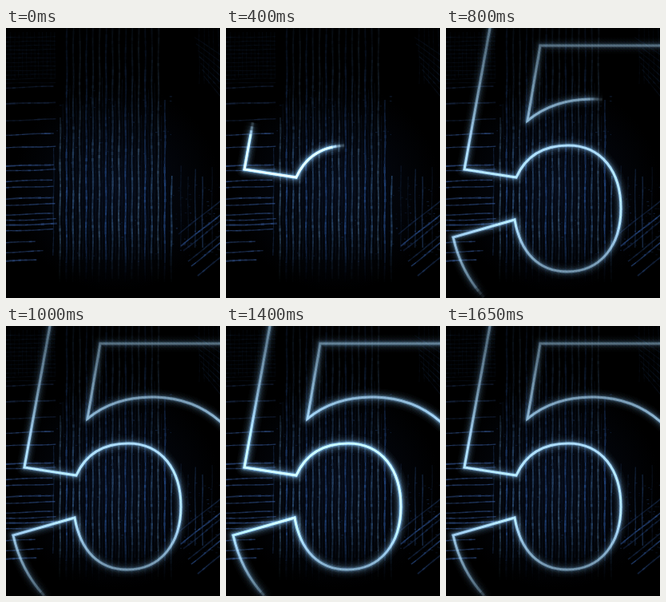
These frames come from a looping animation (268x338 px, 8000 ms). An HTML page with a canvas:

```html
<!DOCTYPE html>
<html lang="en">
<head>
<meta charset="utf-8">
<title>Neon five</title>
<style>
  html, body { margin: 0; width: 100%; height: 100%; overflow: hidden; background: #000; }
  canvas { position: absolute; left: 0; top: 0; width: 268px; height: 338px; }
</style>
</head>
<body>
<canvas id="wall" width="268" height="338"></canvas>
<canvas id="neon" width="268" height="338" style="mix-blend-mode: screen"></canvas>
<script>
const W = 268, H = 338, LOOP = 8000;
const wall = document.getElementById('wall').getContext('2d');
const neon = document.getElementById('neon').getContext('2d');

let seed = 57;
const rnd = () => (seed = (seed * 16807) % 2147483647) / 2147483647;

// Linear interpolation through [position, value] points
function along(points, x) {
  if (x <= points[0][0]) return points[0][1];
  for (let i = 1; i < points.length; i++) {
    const [x0, v0] = points[i - 1], [x1, v1] = points[i];
    if (x <= x1) return v0 + (v1 - v0) * (x - x0) / (x1 - x0);
  }
  return points[points.length - 1][1];
}

// A rough scratched line whose strength varies along its length
function scratch(x0, y0, x1, y1, width, strength, color = '42,78,132') {
  const n = Math.max(2, Math.round(Math.hypot(x1 - x0, y1 - y0) / 4));
  const wobble = rnd() * 6;
  const at = i => {
    const k = i / n, d = Math.sin(i * 0.35 + wobble) * 0.35;
    const side = Math.abs(x1 - x0) > Math.abs(y1 - y0);
    return [x0 + (x1 - x0) * k + (side ? 0 : d), y0 + (y1 - y0) * k + (side ? d : 0)];
  };
  for (let i = 0; i < n; i++) {
    const [ax, ay] = at(i), [bx, by] = at(i + 1);
    const a = strength(ax, ay) * (0.55 + 0.45 * rnd());
    wall.strokeStyle = `rgba(${color},${a})`;
    wall.lineWidth = width * (0.75 + 0.5 * rnd());
    wall.beginPath();
    wall.moveTo(ax, ay);
    wall.lineTo(bx, by);
    wall.stroke();
  }
}

function drawWall() {
  wall.fillStyle = '#000';
  wall.fillRect(0, 0, W, H);

  const haze = wall.createRadialGradient(138, 200, 10, 138, 200, 130);
  haze.addColorStop(0, '#050a16');
  haze.addColorStop(1, '#000');
  wall.fillStyle = haze;
  wall.fillRect(0, 0, W, H);

  // Upright slats
  const fade = [[0, 0.16], [60, 0.3], [110, 0.42], [150, 0.66], [200, 0.85],
                [255, 0.8], [278, 0.5], [292, 0.22], [318, 0]];
  for (let i = 0; i < 18; i++) {
    const x = 68 + i * 8.2;
    const edge = i < 1 || i > 15;
    const top = i === 0 ? 112 : i > 16 ? 185 : edge ? 90 : 0;
    const color = i % 3 === 0 ? '58,88,118' : i % 3 === 1 ? '36,74,136' : '46,82,124';
    scratch(x, top, x - 0.5, 318, 2, (px, py) => along(fade, py), color);
    if (i < 16) scratch(x + 3.5, 60 + rnd() * 60, x + 3.5, 290, 1, () => 0.16);
  }
  scratch(60, 150, 59, 285, 1.3, () => 0.4);

  // Level slats on the left
  const rows = [74, 94, 115, 133, 149, 172, 178, 191, 199, 213, 221, 233, 240, 246, 253, 268, 280, 291];
  rows.forEach((y, i) => {
    const end = y > 262 ? 34 + rnd() * 20 : 58 + rnd() * 6;
    const power = y < 120 ? 0.38 : 0.75;
    scratch(0, y + 1, end, y - 1, i % 4 === 1 ? 1.9 : 1.4, () => power, '48,80,138');
  });
  for (let i = 0; i < 12; i++) {
    scratch(0, 12 + i * 5.2, 62, 11 + i * 5.2, 1, () => 0.17);
    scratch(6 + i * 5, 5, 6 + i * 5, 62, 1, () => 0.1);
  }

  // Loose strokes on the right
  for (const x of [219, 228, 237, 246, 258])
    scratch(x, 172 + rnd() * 20, x, 275, 1.5, () => x === 237 || x === 246 ? 0.5 : 0.2);
  for (const [x, y, a] of [[219, 273, 0.85], [222, 279, 0.4], [232, 298, 0.75], [228, 292, 0.4], [240, 310, 0.55], [216, 258, 0.4]])
    scratch(x, y, x + 58, y - 46, 1.8, () => a, '42,78,140');
  for (let i = 0; i < 7; i++)
    scratch(236 + i * 2, 12 + i * 8, 270, 34 + i * 9, 1.1, () => 0.2);
  for (let i = 0; i < 5; i++)
    scratch(242 + i * 6, 0, 242 + i * 6, 70, 1, () => 0.12);

  // Specks
  for (let i = 0; i < 150; i++) {
    wall.fillStyle = `rgba(40,72,130,${0.1 + rnd() * 0.35})`;
    const low = i % 2;
    wall.fillRect(low ? 205 + rnd() * 63 : 60 + rnd() * 150,
                  low ? 195 + rnd() * 90 : 75 + rnd() * 220, 1 + rnd() * 2, 1);
  }
}

// The outline grows from one point in both directions
const arms = [
  {
    path: new Path2D('M55 182 L23 177 L55 0 L62 -40 H300 V22 H118 L102 116 C125 97 155 88 187 89 C225 90 252 103 274 125'),
    grow: [12, 40, 88, 230, 450, 690, 926, 985, 1060]
  },
  {
    path: new Path2D('M55 182 L88 187 C100 160 122 147 153 147 C195 147 219 180 219 226 C219 273 193 305 152 305 C115 305 93 280 86 240 L9 262 C16 293 30 320 52 342'),
    grow: [12, 50, 106, 215, 330, 450, 610, 620, 620]
  }
];
const light = [[0, 0.52], [22, 0.46], [90, 0.66], [150, 0.95], [185, 1],
               [245, 1], [275, 0.78], [305, 0.62], [338, 0.38]];
const pulse = [[1150, 0], [1200, 0.2], [1300, 0.4], [1400, 0.65], [1500, 1], [1550, 0.95], [1650, 0]];
const layers = [[20, 0.035], [16, 0.05], [12.5, 0.07], [9.5, 0.1], [7, 0.15], [5, 0.22]];

function shade(rgb, alpha) {
  const g = neon.createLinearGradient(0, 0, 0, H);
  for (const [y, v] of light) g.addColorStop(y / H, `rgba(${rgb},${Math.min(1, alpha * v)})`);
  return g;
}

function strokeArm(arm, length, width, style) {
  const tips = 4;
  neon.lineWidth = width;
  neon.strokeStyle = style;
  neon.globalAlpha = 1 / tips;
  for (let i = 0; i < tips; i++) {
    neon.setLineDash([Math.max(0.1, length - i * 5 + 4), 4000]);
    neon.stroke(arm.path);
  }
}

function drawNeon(t) {
  neon.globalCompositeOperation = 'source-over';
  neon.clearRect(0, 0, W, H);
  if (t < 200) return;
  neon.globalCompositeOperation = 'lighter';
  const step = Math.min(8, (t - 200) / 100);
  const glow = along(pulse, t);
  const fresh = along([[400, 1.3], [800, 1]], t);
  for (const arm of arms) {
    const length = arm.grow[Math.floor(step)];
    neon.lineJoin = 'round';
    for (const [w, a] of layers)
      strokeArm(arm, length, w * (1 + 0.12 * glow), shade('105,155,195', a * fresh * (1 + 0.5 * glow)));
    neon.lineJoin = 'miter';
    strokeArm(arm, length, 3, shade('160,188,204', 0.72 * fresh * (1 + 0.12 * glow)));
  }
}

// Held poses: tenths of a second while drawing, twentieths while pulsing
function pose(t) {
  if (t < 200) return 0;
  if (t < 1000) return Math.floor(t / 100) * 100;
  if (t < 1200) return 1000;
  if (t < 1300) return 1200;
  return Math.min(1650, Math.floor(t / 50) * 50);
}

let shown = -1;
const start = performance.now();
function tick() {
  const t = pose((performance.now() - start) % LOOP);
  if (t !== shown) drawNeon(shown = t);
  requestAnimationFrame(tick);
}

drawWall();
tick();
</script>
</body>
</html>
```
